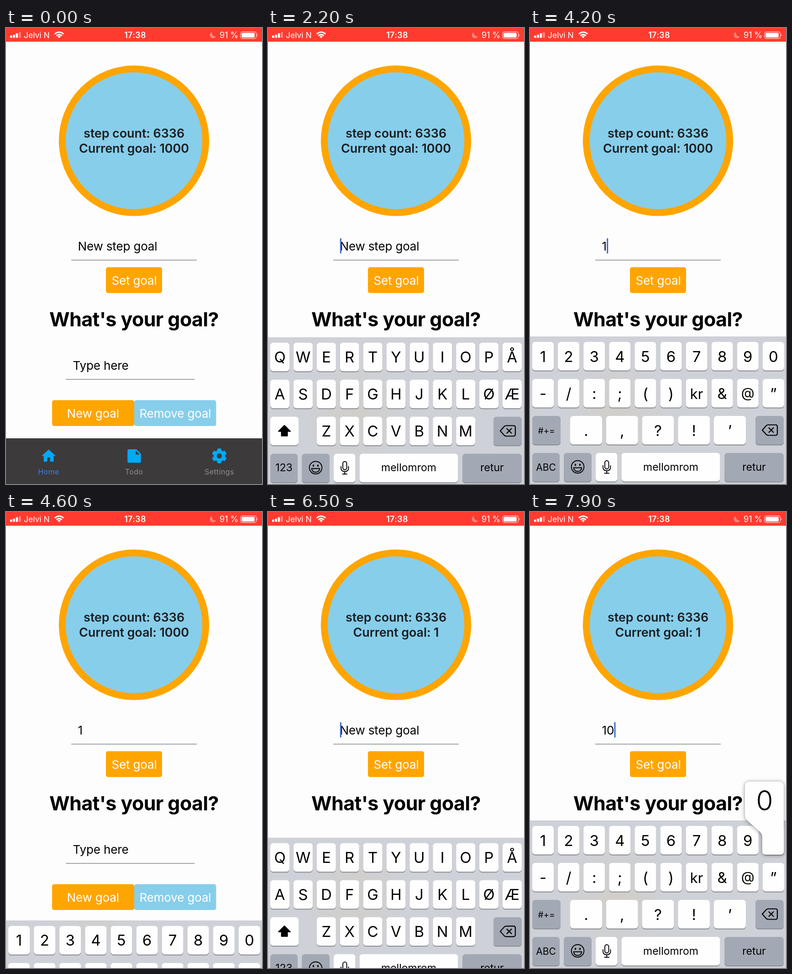
Recreate the animation shown at these times as an HTML page. Size 561 by 998 pixels, loop 8 s.

```html
<!DOCTYPE html>
<html lang="en">
<head>
<meta charset="utf-8">
<title>Step goal</title>
<style>
  html, body { margin: 0; width: 100%; height: 100%; overflow: hidden; background: #fefdfe; }
  svg { display: block; width: 100%; height: 100%; font-family: Inter, Roboto, sans-serif; }
  .body { font-size: 26px; letter-spacing: -.15px; }
  .mid { text-anchor: middle; }
  .ring { font-size: 27px; font-weight: 600; letter-spacing: -.1px; fill: #1b1d20; }
  .tab { font-size: 16px; letter-spacing: .4px; fill: #8f8e90; }
  .status { font-size: 18px; }
  .line { fill: none; stroke: #000; stroke-width: 2.2; stroke-linecap: round; stroke-linejoin: round; }
</style>
</head>
<body>
<svg viewBox="0 0 561 998" preserveAspectRatio="none">
  <defs>
    <radialGradient id="glow" gradientUnits="userSpaceOnUse" cx="190" cy="168" r="120">
      <stop offset="0" stop-color="#ffa500" stop-opacity=".07"/>
      <stop offset="1" stop-color="#ffa500" stop-opacity="0"/>
    </radialGradient>
  </defs>
  <rect width="561" height="998" fill="#fefdfe"/>

  <g id="statusBar" fill="#fff">
    <rect width="561" height="30" fill="#ff3b30"/>
    <rect x="9" y="16.5" width="4.6" height="5" rx="1"/>
    <rect x="15.3" y="14.5" width="4.6" height="7" rx="1"/>
    <rect x="21.6" y="11.5" width="4.6" height="10" rx="1"/>
    <rect x="28" y="9" width="4.6" height="12.5" rx="1" opacity=".4"/>
    <text x="39" y="22" class="status" style="font-size:17.5px">Jelvi N</text>
    <g fill="none" stroke="#fff" stroke-width="3">
      <path d="M106.8 13.2Q116.5 4.8 126.2 13.2"/>
      <path d="M110.4 17Q116.5 11.8 122.6 17"/>
    </g>
    <path d="M116.5 22.3L113 18.6Q116.5 15.8 120 18.6z"/>
    <text x="283" y="22" class="status mid" font-weight="600" letter-spacing=".3">17:38</text>
    <path d="M451 9A7 7 0 1 0 460 18.5A8 8 0 0 1 451 9z" opacity=".38"/>
    <text x="468" y="22" class="status">91 %</text>
    <rect x="514" y="8.5" width="34.5" height="14.5" rx="3.8" fill="none" stroke="#fff" stroke-width="1.3" opacity=".75"/>
    <rect x="516.3" y="10.8" width="28.5" height="10" rx="1.8"/>
    <path d="M550 13.2Q552.6 15.8 550 18.4z" opacity=".75"/>
  </g>

  <circle cx="280.5" cy="246.8" r="157.2" fill="#87ceeb" stroke="#ffa500" stroke-width="15"/>
  <text x="280.5" y="240" class="ring mid">step count: 6336</text>
  <text x="280.5" y="272.5" class="ring mid" id="goal"></text>

  <text x="157.5" y="486.5" class="body" id="field"></text>
  <rect id="caret" y="460" width="3" height="33.5" rx="1.2" fill="#3f6ccb"/>
  <path d="M143 508H418M131 769H413.5" stroke="#85898f" stroke-width="1.6"/>
  <g id="setGoal">
    <rect x="219" y="523.6" width="123" height="56.4" rx="4.5" fill="#ffa500"/>
    <text x="281" y="562" class="body mid" fill="#fff">Set goal</text>
  </g>
  <text x="280.5" y="653" class="mid" font-size="43" font-weight="700" letter-spacing="-.6">What's your goal?</text>
  <text x="146.6" y="747.5" class="body">Type here</text>
  <rect x="101" y="814.6" width="180" height="56.4" rx="4.5" fill="#ffa500"/>
  <rect x="281" y="814.6" width="179.5" height="56.4" rx="4.5" fill="#87ceeb"/>
  <text x="190.7" y="853" class="body mid" fill="#fff">New goal</text>
  <text x="371" y="853" class="body mid" fill="#fff">Remove goal</text>

  <g id="tabs">
    <rect y="898" width="561" height="101" fill="#3c3a3b"/>
    <g fill="#03a9f4">
      <path transform="translate(74.8 917.8) scale(1.56)" d="M10 20V14H14V20H19V12H22L12 3L2 12H5V20z"/>
      <path transform="translate(261.3 917) scale(1.64)" fill-rule="evenodd"
        d="M14 10V4.5L19.5 10zM5 3Q3 3 3 5V19Q3 21 5 21H19Q21 21 21 19V9L15 3z"/>
      <g id="gear" transform="translate(467.5 936.5)">
        <circle r="8.8" fill="none" stroke="#03a9f4" stroke-width="6.4"/>
      </g>
    </g>
    <text x="93.5" y="976.5" class="tab mid" style="fill:#3b7df5">Home</text>
    <text x="280.5" y="976.5" class="tab mid">Todo</text>
    <text x="467.5" y="976.5" class="tab mid">Settings</text>
  </g>

  <g id="keyboard">
    <rect width="561" height="324" fill="#ced1d7"/>
    <rect width="561" height="324" fill="url(#glow)"/>
    <g id="letters"></g>
    <g id="numbers"></g>
    <g id="shared"></g>
    <g id="popup">
      <path id="bubble" fill="#fefefe" style="filter:drop-shadow(0 1px 4px rgba(0,0,0,.45))"
        d="M481 -85H546Q556 -85 556 -75V68Q556 75 549 75H516Q509 75 509 68V37Q509 30 504 25L478 2Q471 -4 471 -13V-75Q471 -85 481 -85z"/>
      <text id="bubbleText" y="-22" class="mid" font-size="60" font-weight="300"></text>
    </g>
  </g>
</svg>
<script>
const LOOP = 8000, STEP = 100, KEYS_TOP = 675, KEYS_HEIGHT = 323, GLOW_Y = 843;
const ROWS = [12, 93, 174, 255];
const $ = id => document.getElementById(id);
const clamp = v => Math.max(0, Math.min(1, v));

function add(parent, tag, attrs, text = '') {
  const el = document.createElementNS('http://www.w3.org/2000/svg', tag);
  for (const name in attrs) el.setAttribute(name, attrs[name]);
  el.textContent = text;
  parent.appendChild(el);
  return el;
}

function key(parent, x, row, width, label = '', { dark = false, size = 33, base = 43.5 } = {}) {
  const y = ROWS[row], box = { x, width, height: 62.5, rx: 6.5 };
  add(parent, 'rect', { ...box, y: y + 2, fill: '#898c92' });
  add(parent, 'rect', { ...box, y, fill: dark ? '#a3a9b4' : '#fefefe' });
  if (label) add(parent, 'text', { x: x + width / 2, y: y + base, class: 'mid', 'font-size': size }, label);
}

function keyRow(parent, labels, row, x, pitch, width) {
  labels.forEach((label, i) => {
    const style = label === '@' ? { size: 30, base: 40.5 } : label === 'kr' ? { size: 31 } : {};
    key(parent, x + i * pitch, row, width, label, style);
  });
}

function buildKeyboard() {
  const letters = $('letters'), numbers = $('numbers'), shared = $('shared');
  const word = (size, dark) => ({ size, dark, base: 38.5 });

  keyRow(letters, [...'QWERTYUIOPÅ'], 0, 5, 50.9, 42);
  keyRow(letters, [...'ASDFGHJKLØÆ'], 1, 5, 50.9, 42);
  keyRow(letters, [...'ZXCVBNM'], 2, 106.8, 50.9, 42);
  key(letters, 5, 2, 62);
  add(letters, 'path', {
    d: 'M36 193L49 206H42.5V216H29.5V206H23z', stroke: '#000', 'stroke-width': 2, 'stroke-linejoin': 'round'
  });
  key(letters, 5, 3, 60, '123', word(23, true));

  keyRow(numbers, [...'1234567890'], 0, 5, 56.1, 47);
  keyRow(numbers, [...'-/:;()', 'kr', ...'&@”'], 1, 5, 56.1, 47);
  keyRow(numbers, [...'.,?!’'], 2, 88, 78.75, 70);
  key(numbers, 5, 2, 62, '#+=', word(19, true));
  key(numbers, 5, 3, 60, 'ABC', word(21, true));

  key(shared, 494, 2, 62, '', { dark: true });
  key(shared, 74, 3, 61, '', { dark: true });
  key(shared, 144, 3, 47.5);
  key(shared, 200.5, 3, 216, 'mellomrom', word(23));
  key(shared, 426, 3, 130, 'retur', word(23, true));

  const line = (d, width = 2.2) => add(shared, 'path', { d, class: 'line', style: `stroke-width:${width}` });
  line('M509 205L518 195Q520 193.5 522 193.5H538Q542 193.5 542 197.5V212.5Q542 216.5 538 216.5H522Q520 216.5 518 215z');
  line('M523.5 200L533.5 210M533.5 200L523.5 210');
  add(shared, 'circle', { cx: 104.5, cy: 285.5, r: 13.8, class: 'line', style: 'stroke-width:1.9' });
  for (const cx of [99.5, 109.5]) add(shared, 'ellipse', { cx, cy: 281, rx: 1.7, ry: 2.5 });
  line('M95.5 287.5H113.5Q112 295.5 104.5 295.5T95.5 287.5z', 1.8);
  add(shared, 'rect', { x: 164, y: 272, width: 8.5, height: 18, rx: 4.25, class: 'line', style: 'stroke-width:1.9' });
  line('M160 283V286Q160 294 168.2 294T176.5 286V283M168.2 294V299.5M163.5 299.5H173', 1.9);
}

for (let a = 0; a < 360; a += 60)
  add($('gear'), 'path', { d: 'M-6 -9.5L-3.7 -16.2H3.7L6 -9.5z', transform: `rotate(${a})` });
buildKeyboard();

// Critically damped slide, as the system keyboard uses.
function slide(t, start) {
  const x = Math.max(0, t - start) * .01826;
  return 1 - (1 + x) * Math.exp(-x);
}

function keyboardUp(t) {
  if (t < 4472) return slide(t, 1798);
  if (t < 6298) return 1 - slide(t, 4472);
  return slide(t, 6298);
}

function tabDrop(t) {
  if (t < 1900) return 0;
  return t < 6400 ? 1 - clamp((t - 4600) / 300) : 1;
}

function caretAlpha(t) {
  if (t < 1900 || (t >= 4500 && t < 6400)) return 0;
  if ((t >= 3800 && t < 4500) || t >= 7500) return 1;
  const blink = t < 4500 ? (t - 1800) % 1000 : t - 6410;
  return clamp(1 - (blink - 450) / 250);
}

function typed(t) {
  if (t >= 7900) return '10';
  return (t >= 3900 && t < 5600) || t >= 7500 ? '1' : '';
}

function pressed(t) {
  if (t >= 7900) return '0';
  return (t >= 3900 && t < 4200) || (t >= 7500 && t < 7700) ? '1' : '';
}

function buttonAlpha(t) {
  if (t < 5400 || t >= 5800) return 1;
  return .2 + .8 * clamp((t - 5550) / 250);
}

const show = (id, on) => $(id).setAttribute('visibility', on ? 'inherit' : 'hidden');

function draw(t) {
  const value = typed(t), hit = pressed(t), up = keyboardUp(t);
  $('goal').textContent = 'Current goal: ' + (t < 5600 ? 1000 : 1);
  $('field').textContent = value || 'New step goal';
  $('caret').setAttribute('x', 157.8 + (value ? $('field').getComputedTextLength() : 0));
  $('caret').setAttribute('opacity', caretAlpha(t));
  $('setGoal').setAttribute('opacity', buttonAlpha(t));
  $('tabs').setAttribute('transform', `translate(0 ${tabDrop(t) * 101})`);

  const top = KEYS_TOP + (1 - up) * KEYS_HEIGHT;
  $('keyboard').setAttribute('transform', `translate(0 ${top})`);
  $('glow').setAttribute('cy', GLOW_Y - top);
  show('keyboard', up > .004);
  const numeric = (t >= 2600 && t < 6300) || t >= 7200;
  show('letters', !numeric);
  show('numbers', numeric);

  const left = hit === '1';
  show('popup', hit);
  $('bubbleText').textContent = hit;
  $('bubbleText').setAttribute('x', left ? 47 : 514);
  $('bubble').setAttribute('transform', left ? 'matrix(-1 0 0 1 561 0)' : '');
}

const origin = performance.now();
function tick() {
  const t = (performance.now() - origin) % LOOP;
  draw(Math.floor(t / STEP) * STEP);
  requestAnimationFrame(tick);
}
tick();
</script>
</body>
</html>
```
